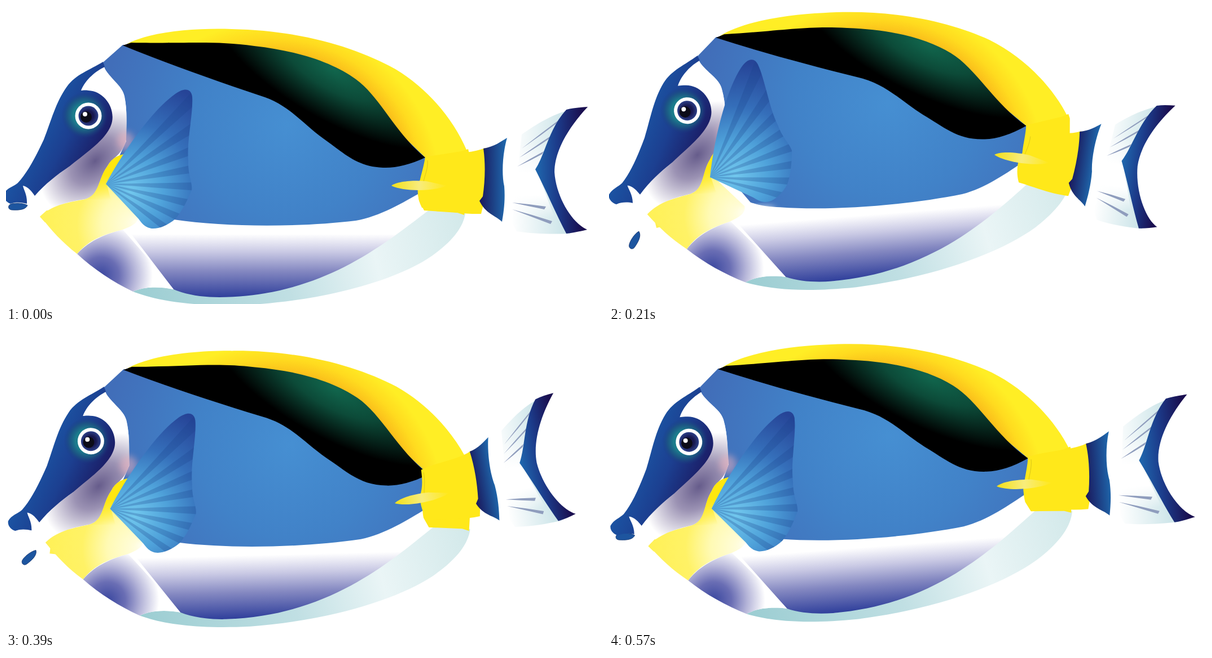
An HTML page that plays this animation: 1058 px wide and 529 px high, repeating every 0.6 s.

```html
<!DOCTYPE html>
<html lang="en">
<head>
<meta charset="utf-8">
<title>Swimming fish</title>
<style>
html, body { margin: 0; width: 100%; height: 100%; overflow: hidden; background: #fff; }
svg { display: block; width: 100%; height: 100%; }
</style>
</head>
<body>
<svg viewBox="0 0 1058 529" xmlns="http://www.w3.org/2000/svg">
<defs>
  <radialGradient id="blue" gradientUnits="userSpaceOnUse" cx="500" cy="210" r="330">
    <stop offset="0" stop-color="#468fd2"/><stop offset=".5" stop-color="#4182c8"/><stop offset="1" stop-color="#416eb9"/>
  </radialGradient>
  <radialGradient id="dorsal" gradientUnits="userSpaceOnUse" cx="470" cy="330" r="310">
    <stop offset=".79" stop-color="#fabb1a"/><stop offset=".88" stop-color="#ffdb1f"/><stop offset=".97" stop-color="#ffee25"/>
  </radialGradient>
  <radialGradient id="green" gradientUnits="userSpaceOnUse" cx="0" cy="0" r="1" gradientTransform="translate(580 112) rotate(30) scale(240 88)">
    <stop offset="0" stop-color="#11664d"/><stop offset=".4" stop-color="#0c4a38"/><stop offset="1" stop-color="#000"/>
  </radialGradient>
  <linearGradient id="belly" gradientUnits="userSpaceOnUse" x1="0" y1="395" x2="0" y2="517">
    <stop offset=".08" stop-color="#fff"/><stop offset=".34" stop-color="#c9c9e4"/><stop offset=".62" stop-color="#8488c1"/><stop offset="1" stop-color="#2f3f9b"/>
  </linearGradient>
  <linearGradient id="keel" gradientUnits="userSpaceOnUse" x1="225" y1="510" x2="812" y2="380">
    <stop offset="0" stop-color="#9bcdd2"/><stop offset=".45" stop-color="#c0dfe3"/><stop offset=".72" stop-color="#eaf5f6"/><stop offset="1" stop-color="#d3e9ea"/>
  </linearGradient>
  <radialGradient id="chest" gradientUnits="userSpaceOnUse" cx="168" cy="478" r="92">
    <stop offset="0" stop-color="#3a479f"/><stop offset=".35" stop-color="#6a6eb4"/><stop offset=".65" stop-color="#b4b4d8"/><stop offset="1" stop-color="#fff"/>
  </radialGradient>
  <radialGradient id="cheek" gradientUnits="userSpaceOnUse" cx="0" cy="0" r="1" gradientTransform="translate(158 275) rotate(-42) scale(112 74)">
    <stop offset="0" stop-color="#665c8b"/><stop offset=".45" stop-color="#9c93b4"/><stop offset="1" stop-color="#fff"/>
  </radialGradient>
  <linearGradient id="face" gradientUnits="userSpaceOnUse" x1="60" y1="200" x2="165" y2="255">
    <stop offset="0" stop-color="#1b55a4"/><stop offset=".5" stop-color="#1c3f90"/><stop offset="1" stop-color="#1b1d66"/>
  </linearGradient>
  <radialGradient id="halo">
    <stop offset=".5" stop-color="#1c7c8c"/><stop offset=".75" stop-color="#1c5a80" stop-opacity=".75"/><stop offset="1" stop-color="#1c3a80" stop-opacity="0"/>
  </radialGradient>
  <radialGradient id="iris">
    <stop offset=".5" stop-color="#17174d"/><stop offset="1" stop-color="#2c3f88"/>
  </radialGradient>
  <radialGradient id="throat" gradientUnits="userSpaceOnUse" cx="228" cy="388" r="165">
    <stop offset="0" stop-color="#fffde4"/><stop offset=".35" stop-color="#fffab4"/><stop offset=".62" stop-color="#fff266"/><stop offset="1" stop-color="#fff157"/>
  </radialGradient>
  <linearGradient id="gill" gradientUnits="userSpaceOnUse" x1="175" y1="300" x2="180" y2="345">
    <stop offset="0" stop-color="#ffe70f"/><stop offset="1" stop-color="#ffe70f" stop-opacity="0"/>
  </linearGradient>
  <radialGradient id="fin" gradientUnits="userSpaceOnUse" cx="220" cy="328" r="200">
    <stop offset="0" stop-color="#72c8ee"/><stop offset=".3" stop-color="#4fa2da"/><stop offset=".6" stop-color="#356fba"/><stop offset="1" stop-color="#264497"/>
  </radialGradient>
  <linearGradient id="band" gradientUnits="userSpaceOnUse" x1="842" y1="0" x2="888" y2="0">
    <stop offset="0" stop-color="#1a1c60"/><stop offset="1" stop-color="#1f6bb0"/>
  </linearGradient>
  <linearGradient id="tail" gradientUnits="userSpaceOnUse" x1="940" y1="0" x2="1020" y2="0">
    <stop offset="0" stop-color="#1f66ad"/><stop offset=".45" stop-color="#1c3c8b"/><stop offset="1" stop-color="#1a0f50"/>
  </linearGradient>
  <linearGradient id="web" gradientUnits="userSpaceOnUse" x1="896" y1="0" x2="985" y2="0">
    <stop offset="0" stop-color="#fff"/><stop offset="1" stop-color="#cfe6ea"/>
  </linearGradient>
  <linearGradient id="mid" gradientUnits="userSpaceOnUse" x1="0" y1="245" x2="0" y2="375">
    <stop offset="0" stop-color="#fff" stop-opacity="0"/><stop offset=".4" stop-color="#fff"/><stop offset=".7" stop-color="#fff"/><stop offset="1" stop-color="#fff" stop-opacity="0"/>
  </linearGradient>
  <linearGradient id="barbFill">
    <stop offset="0" stop-color="#f2e019"/><stop offset=".5" stop-color="#f8ec7c"/><stop offset="1" stop-color="#ffe81a"/>
  </linearGradient>
  <filter id="soft" x="-50%" y="-50%" width="200%" height="200%"><feGaussianBlur stdDeviation="6"/></filter>
  <path id="finShape" d="M177 316C202 268 255 188 300 156C316 145 328 146 330 161C332 192 320 238 323 275C322 300 331 314 329 327C319 350 312 364 300 378C286 390 270 396 258 395C246 393 241 386 235 378Z"/>
  <clipPath id="finClip"><use href="#finShape"/></clipPath>
</defs>

<path id="lip" fill="#1d559f" stroke="#17366f" stroke-width=".8" d="M17-3C10-7-8-7-14-3C-18 0-17 6-11 6.500C0 6.500 13 6 17-3Z"/>

<g id="body">
  <path fill="url(#keel)" d="M225 507C242 499 268 497 297 503L378 517C520 512 640 440 755 358L814 368C810 395 788 422 745 450C680 490 560 524 420 531C330 533 270 524 225 507Z"/>
  <path fill="url(#belly)" d="M200 376L297 503C320 513 350 517 378 517C470 516 540 493 600 463C660 432 700 400 755 358L737 330L600 380L300 376Z"/>
  <path fill="url(#chest)" d="M126 440C150 414 180 404 207 397C232 425 262 460 297 503C268 497 242 499 225 507C190 490 155 467 126 440Z"/>
  <path fill="url(#blue)" d="M207 69L172 100L174 110C188 132 206 142 210 160C216 190 212 215 213 240L190 290L245 366C262 374 278 377 297 379C390 393 520 393 620 381C662 374 705 348 737 330L743 269L600 120L400 70Z"/>
  <path fill="url(#dorsal)" d="M215 67C260 44 340 39 400 41C520 43 620 73 690 112C750 148 796 205 818 260L743 269L620 150L440 80Z"/>
  <path fill="url(#green)" d="M207 70L222 65C320 67 370 61 440 71C520 80 580 101 620 130C662 160 690 226 743 269C715 282 690 288 668 287C620 285 598 260 562 235C524 207 500 174 450 159C370 132 290 104 207 70Z"/>
  <path fill="url(#cheek)" d="M174 108C180 126 202 138 208 155C215 178 214 205 213 238C206 264 190 268 180 284C165 310 166 336 140 343C115 347 90 350 62 374L46 332L112 285L150 150L133 150Z"/>
  <ellipse cx="212" cy="240" rx="15" ry="17" fill="#f2b3bd" opacity=".5" filter="url(#soft)"/>
  <path fill="url(#face)" d="M172 99C148 114 124 121 108 143C88 171 80 204 67 237C53 267 38 296 21 314C13 321 3 322-4 333C-6 342 2 349 8 351C18 347 30 349 37 351C38 335 31 326 30 319C40 321 46 330 51 337C70 315 90 300 112 285C142 260 182 235 188 205C193 178 172 151 146 150C139 149 136 150 133 150C141 130 160 115 175 108Z"/>
  <circle cx="139" cy="194" r="41" fill="url(#halo)"/>
  <circle cx="146" cy="195" r="23.500" fill="#fff"/>
  <circle cx="146" cy="195" r="17.500" fill="url(#iris)"/>
  <circle cx="142" cy="197" r="10" fill="#0c0c18"/>
  <circle cx="140" cy="192" r="4" fill="#fff"/>
  <path id="corner" fill="#fff04f" d="M60 374L72 363L90 362L88 382L69 384Z"/>
  <path fill="url(#throat)" d="M61 373C85 351 115 348 140 343C166 336 163 306 180 284C188 268 204 262 216 263L180 312L234 372C236 385 222 391 207 397C175 405 148 414 126 440C100 420 80 398 61 373Z"/>
  <path fill="url(#gill)" d="M140 343C166 336 163 306 180 284C188 268 204 262 216 263L178 314L186 345Z"/>
  <ellipse cx="256" cy="382" rx="32" ry="7" fill="#fff" opacity=".9" filter="url(#soft)"/>
  <g id="pectoral">
    <use href="#finShape" fill="url(#fin)"/>
    <g id="rays" clip-path="url(#finClip)" fill="#1b438c" opacity=".26"></g>
  </g>
  <path fill="#ffe81a" d="M743 268L806 258L819 254L821 262L812 371L800 367L741 363L732 346C727 318 738 300 743 268Z"/>
</g>

<g id="stalk">
  <path fill="#ffe81a" d="M743 269C780 260 820 264 849 252L849 340L842 369C805 370 770 362 737 358C730 344 728 330 731 314C740 300 742 285 743 269Z"/>
  <path fill="none" stroke="#d9c51a" d="M747 274C748 290 742 300 740 312"/>
  <path fill="url(#band)" d="M846 253C865 250 878 240 888 234C880 262 878 298 883 320C885 345 882 366 879 383C868 372 850 369 839 346L845 338C849 310 850 280 846 253Z"/>
</g>
<path id="barb" fill="url(#barbFill)" d="M0 0C10-8 40-10 62-8L98 0C76 10 22 11 0 0Z"/>

<g id="tailPart">
  <path fill="url(#web)" d="M1012 181C970 190 940 210 914 228L897 385L905 400C940 405 965 405 1000 404L950 290Z"/>
  <path fill="url(#mid)" d="M896 245H962L940 290L972 375H894Z"/>
  <g id="spines" fill="#8f9dbd"></g>
  <path fill="url(#tail)" d="M1031 179C1000 212 972 255 972 295C975 340 1004 386 1030 397C1018 400 1005 403 993 404C975 370 957 327 938 290C956 262 962 218 993 184C1005 181 1018 180 1031 179Z"/>
</g>
</svg>

<script>
const LOOP = 600, STEP = 30;
const LIFT = 210, KICK = 300, END = 570;
const $ = id => document.getElementById(id);
const place = (id, transform) => $(id).setAttribute('transform', transform);
const mix = (a, b, k) => a + (b - a) * k;

// One stroke: steady rise to `lift`, quick snap to `kick`, slow return to `end`.
function stroke(t, lift, kick, end, start = 0) {
  if (t < LIFT) return mix(start, lift, t / LIFT);
  if (t < KICK) return mix(lift, kick, (t - LIFT) / (KICK - LIFT));
  return mix(kick, end, (t - KICK) / (END - KICK));
}

// Half a sine wave between two times, nothing outside.
const beat = (t, from, to, height) =>
  t < from || t > to ? 0 : height * Math.sin(Math.PI * (t - from) / (to - from));

// Shift a part by (dx, dy), then turn and squeeze it about its own pivot.
function pose(id, px, py, dx, dy, turn, squeeze = 1) {
  place(id, `translate(${px + dx} ${py + dy}) rotate(${turn}) scale(${squeeze} 1) translate(${-px} ${-py})`);
}

function addPath(parent, d) {
  const p = document.createElementNS('http://www.w3.org/2000/svg', 'path');
  p.setAttribute('d', d);
  $(parent).append(p);
}

function buildRays() {
  const point = deg => {
    const a = deg * Math.PI / 180;
    return `${177 + 240 * Math.cos(a)} ${316 + 240 * Math.sin(a)}`;
  };
  for (let a = -47; a < 45; a += 11.5) addPath('rays', `M177 316L${point(a)}L${point(a + 5.2)}Z`);
}

function spine(x, y, u, v) {
  const mx = (x + u) / 2, my = (y + v) / 2;
  addPath('spines', `M${x} ${y}Q${mx} ${my - 2} ${u} ${v - 2}L${u - 3} ${v + 3}Q${mx} ${my + 2} ${x} ${y}Z`);
}

function buildSpines() {
  for (let i = 0; i < 3; i++) spine(914 - 4 * i, 253 + 16 * i, 983 - 15 * i, 202 + 29 * i);
  for (let i = 0; i < 2; i++) spine(897, 349 + 12 * i, 957 + 11 * i, 358 + 26 * i);
}

function draw(t) {
  const turn = stroke(t, 8.3, -14, -4), squeeze = stroke(t, .86, .82, 1, 1);
  pose('body', 475, 290, stroke(t, -1, 9, 2), stroke(t, -35.4, -2, -24.7), stroke(t, -4.5, 0, -4.3));
  pose('stalk', 883.5, 308.5, stroke(t, -25.5, -30, 3), stroke(t, -26, -43, -57.5), turn, squeeze);
  pose('tailPart', 1030.5, 288, stroke(t, -43, -61.5, 1), stroke(t, -3.5, -74.5, -68.5), turn, squeeze);
  pose('barb', 0, 0, 683 + stroke(t, 0, 7, 4), 319 + stroke(t, -55, 0, -45), turn);

  const flap = beat(t, 0, 153, 12.3) + beat(t, 153, 388, -25) + beat(t, 388, 576, 21);
  place('pectoral', `rotate(${flap} 177 316)`);

  const open = beat(t, 0, 530, 1) ** 1.5;
  pose('lip', 0, 0, 21 + t / 75 + 24 * open, 356 + t / 80 + 62 * open, 3 - 64 * open);
  place('corner', `rotate(${-62 * open} 90 372)`);
}

function tick() {
  draw(Math.floor(performance.now() % LOOP / STEP) * STEP);
  requestAnimationFrame(tick);
}

buildRays();
buildSpines();
tick();
</script>
</body>
</html>
```
